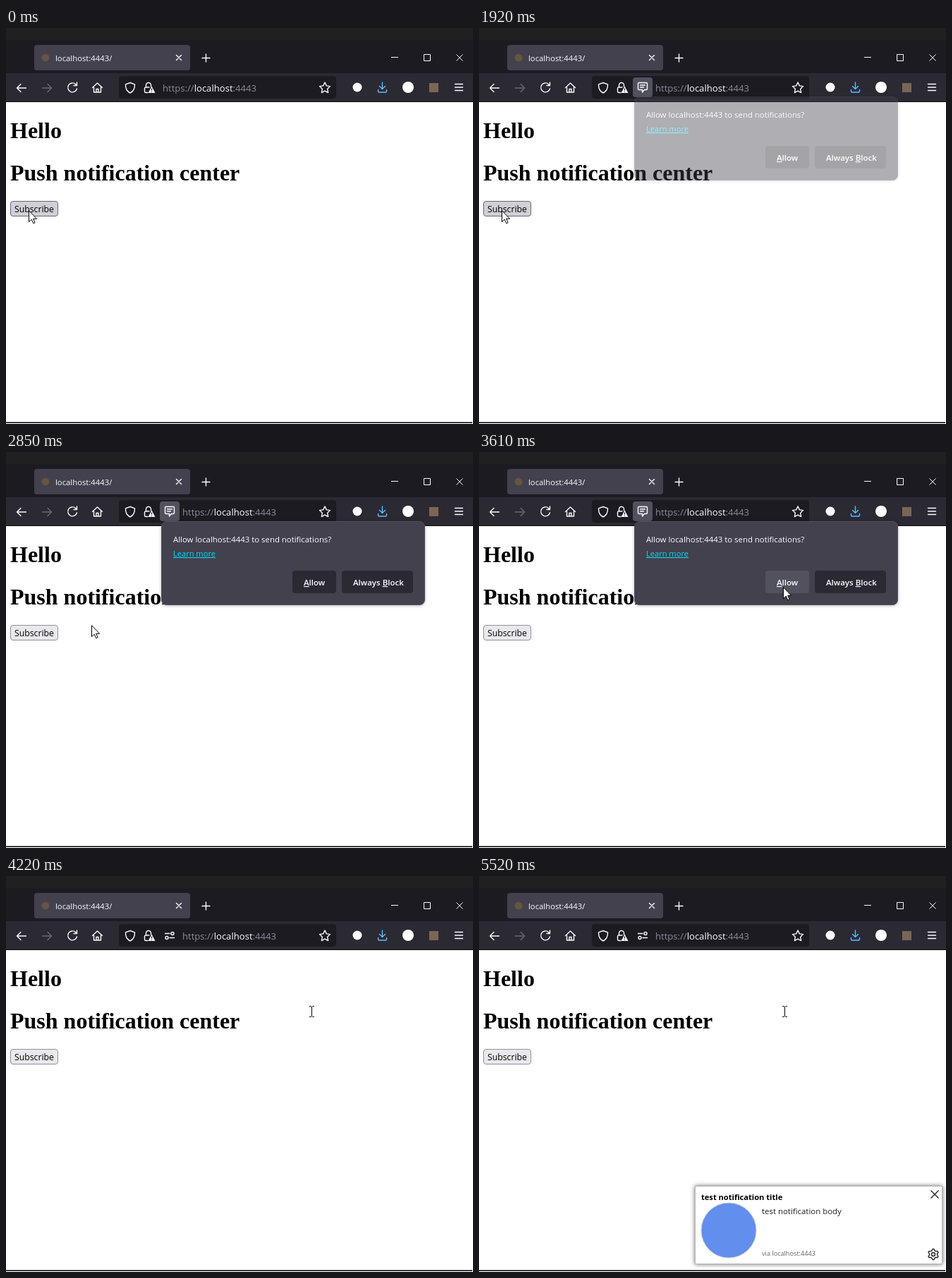
An HTML page for the animation above (6930 ms loop, 662x561 px).

```html
<!DOCTYPE html>
<html lang="en">
<head>
<meta charset="utf-8">
<title>Push notification demo</title>
<style>
html, body { margin: 0; width: 100%; height: 100%; overflow: hidden; background: #fff; }
svg { display: block; width: 662px; height: 561px; font-family: "Open Sans", "Noto Sans", sans-serif; }
.line { fill: none; stroke: #fbfbfe; stroke-width: 1.4; stroke-linecap: round; stroke-linejoin: round; }
.sharp { fill: none; stroke: #fbfbfe; stroke-width: 1; }
.heading { font: bold 32px "Liberation Serif", serif; }
.key { text-decoration: underline; }
#panel text { font-size: 11.4px; font-weight: 500; fill: #fbfbfe; }
#panel .choice { font-size: 11.5px; font-weight: 600; }
#panel .link { font-size: 11.1px; font-weight: 400; fill: #00ddff; text-decoration: underline; }
#panel > rect:first-child { filter: drop-shadow(0 1px 2px #0004); }
#toast > rect { filter: drop-shadow(0 0 3px #0009); }
</style>
</head>
<body>
<svg viewBox="0 0 662 561">
  <!-- window frame -->
  <rect width="662" height="105" fill="#202020"/>
  <rect y="17" width="662" height="47" fill="#1c1b22"/>
  <rect y="64" width="662" height="40" fill="#2b2a33"/>
  <rect y="104" width="662" height="1" fill="#0c0c0d"/>
  <rect x="40" y="24" width="221" height="36" rx="4" fill="#42414d"/>
  <circle cx="56" cy="42" r="5.5" fill="#66543f"/>
  <text x="70" y="47" font-size="11.3" fill="#fbfbfe">localhost:4443/</text>
  <path class="line" stroke-width="1.2" d="M241.500 38.500l7 7m0-7l-7 7M278 42.500h11m-5.500-5.500v11"/>
  <path class="sharp" d="M546 41.500h10M592.500 37.500h9v9h-9zM638.500 37.500l9 9m0-9l-9 9"/>

  <!-- toolbar -->
  <rect x="160" y="68" width="308" height="32" rx="4" fill="#1c1b22"/>
  <g class="line">
    <path d="M28.500 85H15.500m5.500-5.500L15.500 85l5.500 5.500"/>
    <path stroke="#6b6a73" d="M51.500 85h13M59 79.500l5.500 5.500-5.500 5.500"/>
    <path d="M100.500 86a6.500 6.500 0 1 1-2-6.500l2 2m0-4.500v4.500h-4.500"/>
    <path d="M122.500 84.500l7-6.500 7 6.500M124.500 83.500v7.500h10v-7.500M128 91v-4.500h3V91"/>
    <path d="M176 77.500l6.500 2.300c.2 5-1.800 10-6.500 12.200-4.700-2.200-6.700-7.200-6.500-12.200z"/>
    <path d="M198.500 84v-3a3.500 3.500 0 0 1 7 0v2M201 91.500h-3q-1.500 0-1.500-1.500v-4.500q0-1.500 1.500-1.500h5"/>
    <path d="M452 77l2.300 4.900 5.200.7-3.800 3.700.9 5.300-4.600-2.500-4.600 2.500.9-5.300-3.800-3.700 5.200-.7z"/>
    <path stroke="#5fbcff" d="M533.500 77v9.500m-4-4l4 4 4-4M527.500 87.500v2q0 1.500 1.500 1.500h9q1.500 0 1.500-1.500v-2"/>
    <path d="M636.500 79.500h11m-11 4.500h11m-11 4.500h11"/>
  </g>
  <path d="M206.500 82.500l5 9.500h-10z" fill="#fbfbfe"/>
  <path d="M206.500 85.500v3m0 1.200v1" stroke="#1c1b22" stroke-width="1.200"/>
  <circle cx="498" cy="84" r="6.500" fill="#fbfbfe"/>
  <circle cx="570" cy="84" r="8" fill="#fff"/>
  <rect x="600" y="78" width="13" height="13" fill="#7b6656"/>

  <g id="ask">
    <rect x="218" y="70" width="28" height="28" rx="4" fill="#52525e"/>
    <path class="line" d="M227 77.500h10q1.500 0 1.500 1.500v7q0 1.500-1.500 1.500h-2.500l-3 3.500v-3.500H227q-1.500 0-1.500-1.500v-7q0-1.500 1.500-1.500zM228.500 81h7m-7 3h5"/>
  </g>
  <g id="granted" class="line">
    <path d="M225.500 81.500h6.500M232 87.500h6.500"/>
    <circle cx="236" cy="81.500" r="2"/>
    <circle cx="228" cy="87.500" r="2"/>
  </g>
  <text id="url" y="90" font-size="13.100" fill="#8d8b97">https://<tspan fill="#fbfbfe">localhost</tspan>:4443</text>

  <!-- page -->
  <text class="heading" x="6" y="156">Hello</text>
  <text class="heading" x="6" y="216">Push notification center</text>
  <rect id="subscribe" x="6.500" y="245.500" width="67" height="21" rx="3.500"/>
  <text x="12" y="261" font-size="12.250">Subscribe</text>
  <rect y="558" width="661" height="2" fill="#3a3a3a"/>

  <!-- permission panel -->
  <g id="panel">
    <rect x="220.500" y="98.500" width="373" height="118" rx="7" fill="#42414d" stroke="#52525e"/>
    <text x="237" y="128">Allow localhost:4443 to send notifications?</text>
    <text class="link" x="237" y="148">Learn more</text>
    <rect id="allow" x="406" y="168" width="62" height="32" rx="4"/>
    <rect x="476" y="168" width="101" height="32" rx="4" fill="#2b2a33"/>
    <text class="choice" x="422" y="189"><tspan class="key">A</tspan>llow</text>
    <text class="choice" x="492" y="189">Always <tspan class="key">B</tspan>lock</text>
  </g>

  <!-- notification -->
  <g id="toast">
    <rect x="306.500" y="439.500" width="350" height="110" fill="#fff" stroke="#b8b8b8"/>
    <text x="315" y="459" font-size="11.100" font-weight="700">test notification title</text>
    <circle cx="354" cy="502" r="39" fill="#628fee" stroke="#ccc"/>
    <text x="401" y="479" font-size="11.450" fill="#222">test notification body</text>
    <text x="401" y="538" font-size="9.150" fill="#666">via localhost:4443</text>
    <path d="M640.500 445.500l11 11m0-11l-11 11" stroke="#222" stroke-width="1.400"/>
    <g fill="none" stroke="#222" stroke-width="1.400" stroke-linejoin="round">
      <path id="gear"/>
      <circle cx="644" cy="536" r="2.500"/>
    </g>
  </g>

  <path id="arrow" d="M.5.700v16l3.700-3.500 2.600 5.600 2.400-1.100-2.600-5.400h5z" fill="#fff" stroke="#000"/>
  <path id="beam" d="M430 184.500h2.500l1 1 1-1h2.500M433.500 185v14M430 199.500h2.500l1-1 1 1h2.500" fill="none" stroke="#000"/>
</svg>
<script>
const LOOP = 6930;
const el = id => document.getElementById(id);
const set = (id, attrs) => {
  for (const name in attrs) el(id).setAttribute(name, attrs[name]);
};
const show = (id, on) => set(id, { visibility: on ? "visible" : "hidden" });
const clamp = v => Math.max(0, Math.min(1, v));
const between = (t, from, to) => t >= from && t < to;
const tick = (t, start, step) => start + Math.floor((t - start) / step) * step;

const gearPoints = Array.from({ length: 24 }, (_, i) => {
  const a = (i - 0.5) * Math.PI / 12;
  const r = i % 4 < 2 ? 7.500 : 5.500;
  return `${644 + r * Math.sin(a)} ${536 - r * Math.cos(a)}`;
});
set("gear", { d: "M" + gearPoints.join("L") + "Z" });

function pointer(t) {
  if (t < 2850) return [32, 258];
  if (t >= 3610) return [431, 191];
  const p = clamp((tick(t, 2850, 69) - 2850) / 690);
  const ease = 1 - (1 - p) ** 2;
  return [Math.round(121 + 309 * ease), Math.round(245 - 53 * ease)];
}

function panelOpacity(t) {
  if (t < 1850 || t >= 4220) return 0;
  if (t >= 4150) return 0.4;
  return clamp((tick(t, 1850, 70) - 1848) / 170);
}

function draw(t) {
  const [x, y] = pointer(t);
  const pressed = between(t, 1720, 1790);
  const [fill, stroke] = pressed ? ["#b1b1b9", "#484851"]
    : t < 2850 ? ["#d0d0d7", "#676774"] : ["#e9e9ed", "#8f8f9d"];
  set("subscribe", { fill, stroke });

  show("ask", between(t, 1850, 4150));
  show("granted", t >= 4150);
  set("url", { x: t < 1850 ? 222 : 250 });

  const over = x >= 406 && y < 200;
  set("allow", { fill: t >= 4080 ? "#5b5b66" : over ? "#52525e" : "#2b2a33" });
  set("panel", {
    opacity: panelOpacity(t),
    transform: `translate(0 ${t < 1920 ? -8 : t < 1990 ? -1 : 0})`
  });

  set("toast", { opacity: t < 5170 ? 0 : clamp((tick(t, 5170, 70) - 5100) / 420) });
  set("arrow", { transform: `translate(${x} ${y})` });
  show("arrow", t < 4220);
  show("beam", t >= 4220);
}

const begin = performance.now();
function frame() {
  draw((performance.now() - begin) % LOOP);
  requestAnimationFrame(frame);
}
frame();
</script>
</body>
</html>
```
